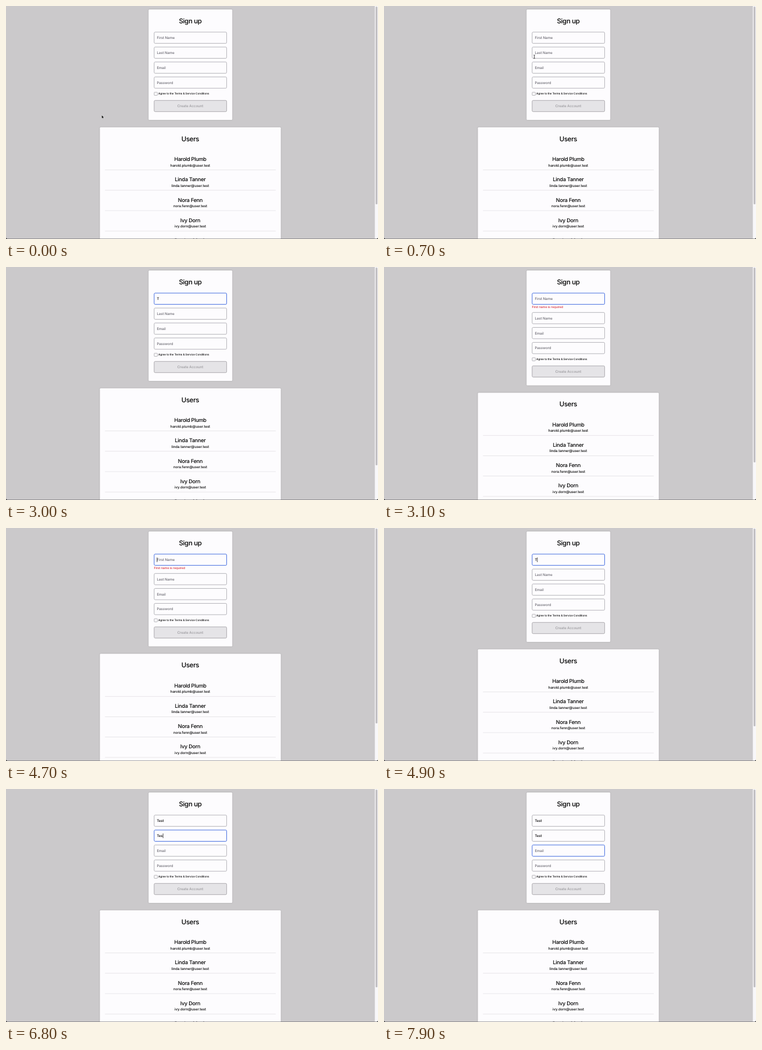
An HTML page for the animation above (8 s loop, 640 by 403 pixels).

```html
<!DOCTYPE html>
<html lang="en">
<head>
<meta charset="utf-8">
<title>Sign up</title>
<style>
  html, body { margin: 0; height: 100%; overflow: hidden; background: #cbc9cb; }
  svg { display: block; width: 100vw; height: 100vh; font: 500 6.1px Inter, "Liberation Sans", sans-serif; letter-spacing: -.01em; text-rendering: geometricPrecision; }
  .mid { text-anchor: middle; }
  .card { fill: #fdfcfe; filter: drop-shadow(0 .7px .8px rgba(0, 0, 0, .16)); }
  .title { font-size: 11.5px; letter-spacing: -.03em; }
  .name { font-size: 9.1px; letter-spacing: -.03em; }
  .box { fill: #fdfcfe; stroke: #a3a1a7; stroke-width: .8; }
  .focus { stroke: #456fe0; stroke-width: 1; }
  .empty { fill: #6c6b73; }
</style>
</head>
<body>
<svg viewBox="0 0 640 403" preserveAspectRatio="none">
  <rect class="card" id="form" x="245.3" y="6" width="144" height="191" rx="1.5"/>
  <text class="mid title" x="317" y="29.8">Sign up</text>
  <g id="fields"></g>
  <text id="error" x="254.5" y="70.5" font-size="5.3" fill="#d9303a">First name is required</text>
  <g id="below">
    <rect class="box" x="255" y="149.2" width="5.4" height="5.4" rx=".6"/>
    <text x="262" y="153.1" font-size="4.65">Agree to the Terms &amp; Service Conditions</text>
    <rect x="254.9" y="163.3" width="124.7" height="19.4" rx="1.8" fill="#e5e4e7" stroke="#a5a3a8" stroke-width=".9"/>
    <text class="mid" x="317" y="175.2" fill="#9a999d">Create Account</text>
    <rect class="card" x="161.5" y="209.7" width="311.3" height="230" rx="1.5"/>
    <text class="mid title" x="317" y="233.7">Users</text>
    <g id="users"></g>
  </g>
  <rect id="caret" y="51" width=".7" height="8"/>
  <rect x="634.6" width="5.4" height="403" fill="#f8f7f9"/>
  <rect id="thumb" x="635.9" y="1" width="3.1" rx="1.5" fill="#c1bfc2"/>
  <path d="M0 402.4H640V403H0Z" fill="#555356"/>
  <path d="M0 400Q0 403 3 403H0ZM640 400Q640 403 637 403H640Z"/>
  <path id="arrow" d="M0 0V6.2L1.5 4.9L2.5 7.1L3.5 6.7L2.5 4.6H4.4Z" fill="#111" stroke="#fff" stroke-width=".5"/>
  <path id="beam" d="M-1.4-3Q0-3 0-2.2Q0-3 1.4-3M0-2.2V2.2M-1.4 3Q0 3 0 2.2Q0 3 1.4 3" fill="none" stroke="#222" stroke-width=".8"/>
</svg>
<script>
const $ = id => document.getElementById(id);
const LOOP = 8000, PITCH = 25.87, ROW = 35.2, SHIFT = 7.7;
const labels = ["First Name", "Last Name", "Email", "Password"];
const people = ["Harold Plumb", "Linda Tanner", "Nora Fenn", "Ivy Dorn", "Gordon Mavis"];

// Each track lists [start time, value].
const focusTrack = [[0, -1], [900, 0], [5600, 1], [7400, 2]];
const caretTrack = [[0, 0], [900, 1], [1400, 0], [1900, .5], [2000, 1], [2400, 0], [2500, 1], [3000, 0],
  [3400, .5], [3500, 1], [3900, .5], [4000, 0], [4400, .5], [4500, 1], [6000, .5], [6100, 0], [6400, 1], [7900, 0]];
const textTracks = [
  [[0, ""], [2500, "T"], [3100, ""], [4900, "T"], [5100, "Te"], [5300, "Tes"], [5400, "Test"]],
  [[0, ""], [6400, "T"], [6600, "Te"], [6800, "Tes"], [6900, "Test"]],
  [[0, ""]],
  [[0, ""]]
];
const valueAt = (track, t) => track.findLast(([start]) => start <= t)[1];

$("fields").innerHTML = labels.map((_, i) => `<g>
  <rect class="box" x="254.9" y="${45.1 + i * PITCH}" width="124.7" height="19.5" rx="1.8"/>
  <text x="259.4" y="${57.2 + i * PITCH}"></text></g>`).join("");

$("users").innerHTML = people.map((name, i) => {
  const y = i * ROW, mail = name.toLowerCase().replace(" ", ".") + "@user.test";
  return `<text class="mid name" x="317" y="${268.2 + y}">${name}</text>
    <text class="mid" x="317" y="${277.6 + y}">${mail}</text>
    <rect x="170.3" y="${283.2 + y}" width="293.8" height=".7" fill="#dfdde1"/>`;
}).join("");

const groups = [...$("fields").children];

function drawFields(t) {
  const focus = valueAt(focusTrack, t), shift = t >= 3100 && t < 4900 ? SHIFT : 0;
  groups.forEach((group, i) => {
    const [box, text] = group.children, value = valueAt(textTracks[i], t);
    group.setAttribute("transform", `translate(0 ${i ? shift : 0})`);
    box.setAttribute("class", i === focus ? "box focus" : "box");
    text.setAttribute("class", value ? "" : "empty");
    text.textContent = value || labels[i];
    if (i === focus) {
      $("caret").setAttribute("x", 259.6 + (value ? text.getComputedTextLength() : 0));
      $("caret").setAttribute("y", 51 + i * PITCH);
    }
  });
  $("caret").setAttribute("opacity", valueAt(caretTrack, t));
  $("error").setAttribute("opacity", shift ? 1 : 0);
  $("below").setAttribute("transform", `translate(0 ${shift})`);
  $("form").setAttribute("height", 191 + shift);
  $("thumb").setAttribute("height", shift ? 337 : 342);
}

function drawPointer(t) {
  const p = Math.min(t / 1000, 1), ease = p * p * (3 - 2 * p);
  const x = 164.5 + 120 * ease, y = 188.5 - 128.5 * ease;
  const overField = x > 254.5 && y > 45 && y < 142 && (y - 45) % PITCH < 19.6;
  for (const [id, visible] of [["arrow", !overField], ["beam", overField]]) {
    $(id).setAttribute("transform", `translate(${x} ${y})`);
    $(id).setAttribute("opacity", visible && t < 2500 ? 1 : 0);
  }
}

const origin = performance.now();
function frame() {
  const t = Math.floor((performance.now() - origin) % LOOP / 100) * 100;
  drawFields(t);
  drawPointer(t);
  requestAnimationFrame(frame);
}
frame();
</script>
</body>
</html>
```
